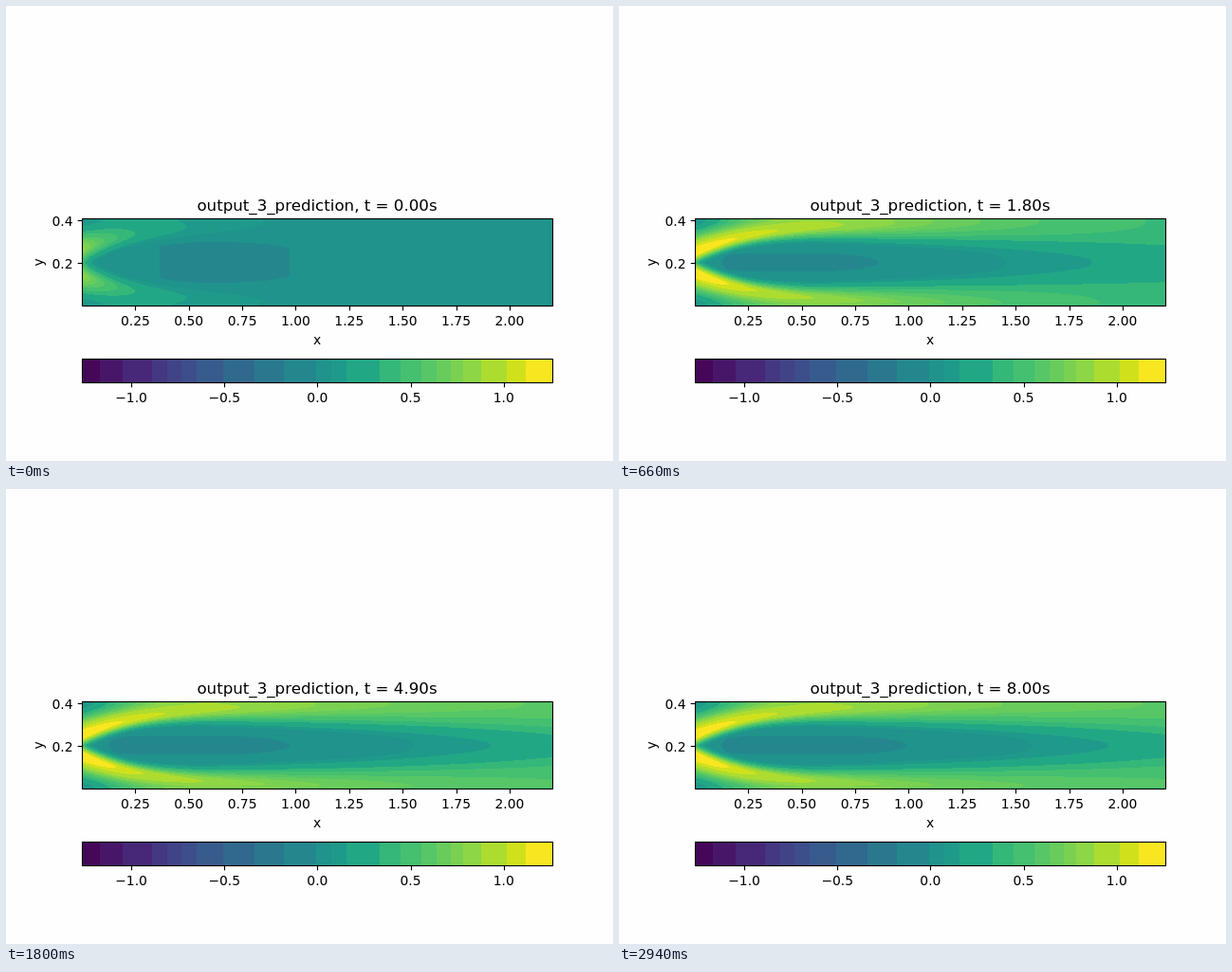
An HTML page with a canvas that plays this animation: 640x480 px, repeating every 3 s.

```html
<!DOCTYPE html>
<html lang="en">
<head>
<meta charset="utf-8">
<title>Flow prediction</title>
<style>
  html, body { margin: 0; width: 100%; height: 100%; overflow: hidden; background: #fefefe; }
  canvas, svg { position: absolute; left: 0; top: 0; }
  #field { left: 80px; top: 225px; }
  text { font: 13.89px "DejaVu Sans", sans-serif; text-anchor: middle; fill: #000; }
  #title { font-size: 16.67px; }
  .line { stroke: #000; stroke-width: 1.11; fill: none; }
</style>
</head>
<body>
<canvas id="field" width="496" height="92"></canvas>
<svg id="plot" width="640" height="480" viewBox="0 0 640 480">
  <g id="bar" shape-rendering="crispEdges"></g>
  <rect class="line" x="80.5" y="224.5" width="496" height="92"/>
  <rect class="line" x="80.5" y="372.5" width="496" height="25"/>
  <text id="title" x="328" y="216">output_3_prediction, t = 0.00s</text>
  <text x="328" y="357">x</text>
  <text transform="translate(39 270.5) rotate(-90)">y</text>
</svg>
<script>
const W = 496, H = 92, FRAMES = 50, STEP = 60, END = 8;
const PER_UNIT = 196.3, ZERO = 328.4;

// Colour band edges along the colour bar, in pixels
const edges = [80, 99, 123, 154, 170, 185, 201, 229, 262, 293, 327, 343, 359,
  394, 416, 438, 454, 469, 482, 501, 528, 548, 576];
const colors = ['450758', '471669', '472777', '443882', '414387', '3d4e8a', '375b8d',
  '30698e', '2a788e', '24878e', '20938c', '1f9a8a', '22a785', '35b779', '45bf70',
  '56c667', '67cc5c', '7ad151', '8dd645', 'addc30', 'd0e11c', 'f8e621'];

const plot = document.getElementById('plot');
const bar = document.getElementById('bar');
const title = document.getElementById('title');

function add(parent, tag, attrs, text) {
  const el = document.createElementNS('http://www.w3.org/2000/svg', tag);
  for (const key in attrs) el.setAttribute(key, attrs[key]);
  if (text) el.textContent = text;
  parent.appendChild(el);
}

function tickX(x, y, label) {
  const px = Math.round(x) + 0.5;
  add(plot, 'path', { class: 'line', d: `M${px} ${y}v4.86` });
  add(plot, 'text', { x, y: y + 20.2 }, label);
}

function tickY(y, label) {
  add(plot, 'path', { class: 'line', d: `M80.5 ${y}h-4.86` });
  add(plot, 'text', { x: 59.5, y: y + 5 }, label);
}

colors.forEach((c, i) => add(bar, 'rect',
  { x: edges[i], y: 373, width: edges[i + 1] - edges[i], height: 24, fill: '#' + c }));
for (let v = 0.25; v <= 2; v += 0.25) tickX(80 + v * W / 2.2, 316.5, v.toFixed(2));
for (let v = -1; v <= 1; v += 0.5)
  tickX(ZERO + v * PER_UNIT, 397.5, v.toFixed(1).replace('-', '\u2212'));
tickY(226.5, '0.4');
tickY(271.5, '0.2');

const { exp, pow, max, min, abs, cos, PI } = Math;
const mix = (a, b, k) => a + (b - a) * k;
const smooth = u => { u = max(0, min(1, u)); return u * u * (3 - 2 * u); };

// Flow profile of one column: core, jet peak and wall values
function column(x, t) {
  const grown = 1 - exp(-pow(t / (0.3 + x / 345), 1.6));
  const xs = x + 82 * exp(-t / 1.9);
  const restCore = 0.04 - 0.06 * exp(-pow((x - 150) / 140, 2));
  const fullCore = -0.02 + 0.25 * pow(max(0, xs - 160) / 336, 1.8);
  const opening = 1 - exp(-pow(x / 45, 1.5));
  return {
    core: mix(restCore, fullCore, pow(grown, 0.4)) + 0.4 * exp(-x / 8),
    bow: 0.3 * grown,
    peak: mix(0.05 + 0.78 * exp(-x / 55), 0.56 + 0.68 * exp(-x / 220), grown),
    peakAt: 0.2 + 0.1 * (1 - grown) * exp(-x / 70) + 0.74 * (1 - exp(-x / 70)),
    inner: -0.06 + 0.46 * opening - 0.45 * max(0, x - 120) / 376,
    drop: 0.06 * grown * smooth(x / 90),
    wall: 1 - exp(-pow(x / 65, 1.4))
  };
}

// Value at distance d from the axis (0) to the wall (1)
function value(c, d, below) {
  const peak = c.peak - (below ? c.drop : 0);
  if (d < c.peakAt) {
    const k = smooth((d - c.inner) / (c.peakAt - c.inner));
    return mix(c.core + c.bow * d * d, peak, k);
  }
  const wall = mix(0.05, peak, c.wall * (below ? 0.93 : 1));
  const u = min(1, (d - c.peakAt) / (1 - c.peakAt));
  return mix(peak, wall, (1 - cos(PI * u)) / 2);
}

// Packed colour for every pixel of the colour bar
const shades = new Uint32Array(W);
colors.forEach((c, i) => {
  const n = parseInt(c, 16);
  const abgr = 0xff000000 | (n & 255) << 16 | (n & 0xff00) | n >> 16;
  shades.fill(abgr, edges[i] - 80, edges[i + 1] - 80);
});

const ctx = document.getElementById('field').getContext('2d');
const image = ctx.createImageData(W, H);
const pixels = new Uint32Array(image.data.buffer);

function draw(t) {
  for (let x = 0; x < W; x++) {
    const c = column(x, t);
    for (let y = 0; y < H; y++) {
      const off = y - 45;
      const v = value(c, abs(off) / 46, off > 0);
      const i = Math.floor(ZERO - 80 + v * PER_UNIT);
      pixels[y * W + x] = shades[max(0, min(W - 1, i))];
    }
  }
  ctx.putImageData(image, 0, 0);
  title.textContent = `output_3_prediction, t = ${t.toFixed(2)}s`;
}

let shown = -1;
function tick() {
  const index = Math.floor(performance.now() / STEP) % FRAMES;
  if (index !== shown) {
    shown = index;
    draw(END * index / (FRAMES - 1));
  }
  requestAnimationFrame(tick);
}
tick();
</script>
</body>
</html>
```
